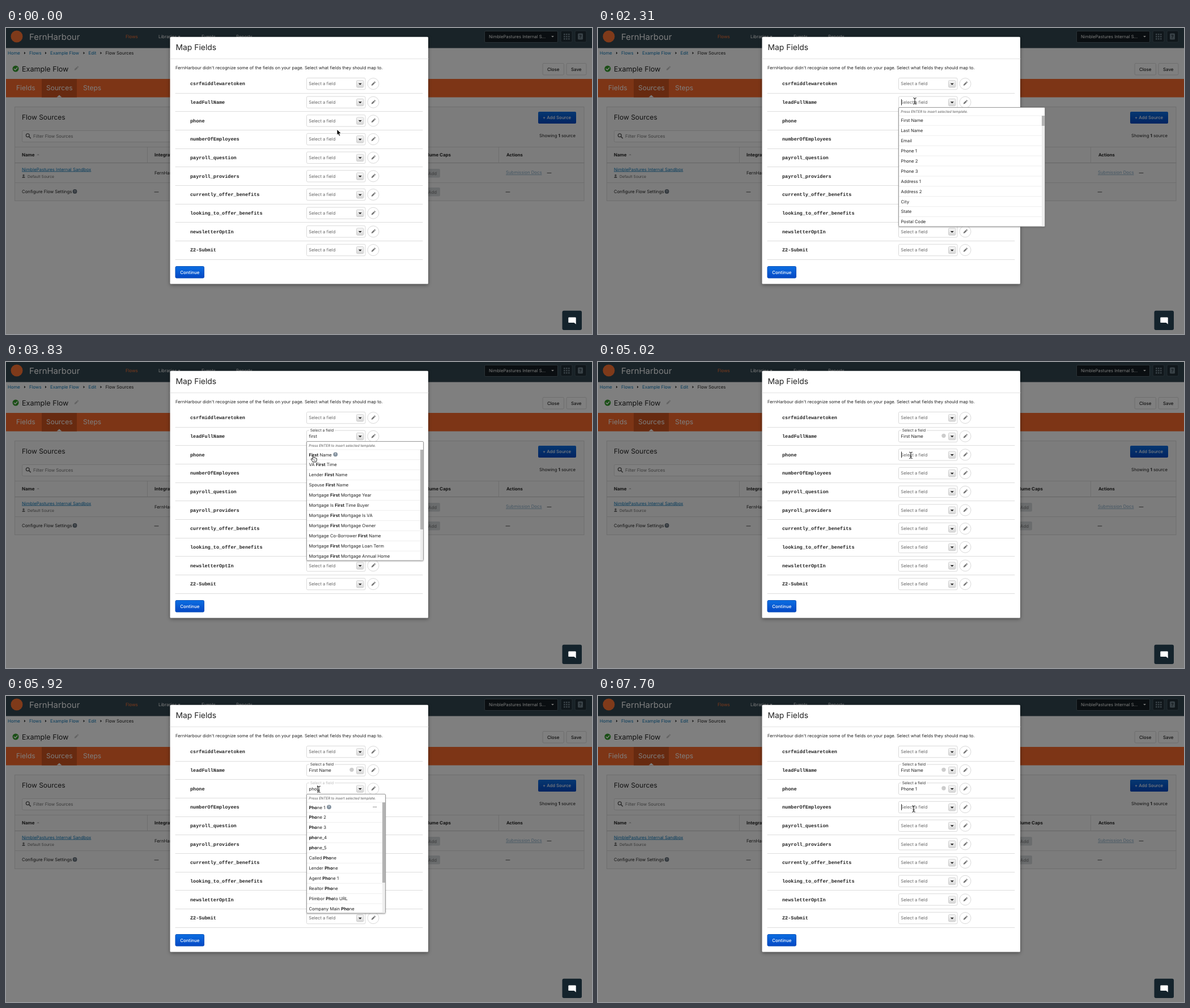
Recreate the animation shown at these times as an HTML page. Size 1034 by 541 pixels, loop 7990 ms.

```html
<!DOCTYPE html>
<html lang="en">
<head>
<meta charset="utf-8">
<title>Map Fields</title>
<style>
html, body { margin: 0; width: 100%; height: 100%; overflow: hidden; background: #808080; }
svg { display: block; width: 1034px; height: 541px; }
text { font-family: Inter, "Open Sans", sans-serif; text-rendering: geometricPrecision; white-space: pre; }
.mono { font-family: "Liberation Mono", "DejaVu Sans Mono", monospace; font-weight: 700; }
.b { font-weight: 700; }
.m { font-weight: 500; }
.i { font-style: italic; }
.u { text-decoration: underline; }
.modal { filter: drop-shadow(0 2px 3px rgba(0,0,0,.4)); }
.menu { filter: drop-shadow(0 1px 1px rgba(0,0,0,.25)); }
</style>
</head>
<body>
<svg viewBox="0 0 1034 541" xmlns="http://www.w3.org/2000/svg">
  <defs>
    <linearGradient id="blue" x2="0" y2="1"><stop stop-color="#0b6ee2"/><stop offset="1" stop-color="#0548c4"/></linearGradient>
    <linearGradient id="grey" x2="0" y2="1"><stop stop-color="#f8f8f8"/><stop offset="1" stop-color="#d6d6d6"/></linearGradient>
    <clipPath id="menuClip"><rect x="531" y="0" width="260" height="210"/></clipPath>
  </defs>
  <g id="page"></g>
  <rect width="1034" height="541" opacity=".5"/>
  <g id="modal"></g>
  <g id="live"></g>
  <g id="pointer"></g>
  <g id="chat"></g>
</svg>
<script>
const LOOP = 7990;
const INK = '#222', LINK = '#0c78b8', SMALL = 7.7;
const $ = id => document.getElementById(id);

const text = (x, y, s, size = SMALL, fill = INK, cls = '') =>
  `<text x="${x}" y="${y}" font-size="${size}" fill="${fill}" class="${cls}">${s}</text>`;
const rect = (x, y, w, h, fill, stroke = 'none', r = 0) =>
  `<rect x="${x}" y="${y}" width="${w}" height="${h}" rx="${r}" fill="${fill}" stroke="${stroke}"/>`;
const path = (d, fill, stroke = 'none', w = 1) =>
  `<path d="${d}" fill="${fill}" stroke="${stroke}" stroke-width="${w}" stroke-linejoin="round" stroke-linecap="round"/>`;
const dot = (x, y, r, fill, stroke = 'none') =>
  `<circle cx="${x}" cy="${y}" r="${r}" fill="${fill}" stroke="${stroke}"/>`;
const hline = (x1, x2, y, c) => path(`M${x1} ${y}H${x2}`, 'none', c);
const caretDown = (x, y, c, w = 3) => path(`M${x - w} ${y - w / 2}h${2 * w}l${-w} ${w}z`, c);
const pencil = (x, y, c) =>
  `<g transform="translate(${x} ${y}) rotate(45)">` +
  rect(-1.3, -4.8, 2.6, 1.5, c) + path('M-1.3 -2.7h2.6v5.2l-1.3 2.2l-1.3 -2.2z', c) + '</g>';
const help = (x, y, fill) =>
  dot(x, y, 3.9, fill) + text(x - 1.6, y + 2, '?', 5.4, '#fff', 'm');

function drawPage() {
  const nav = [['Flows', 211, '#ff7434'], ['Libraries', 269, '#fff'], ['Events', 345, '#fff'], ['Reports', 406, '#fff']];
  const crumbs = [['Home', 3], ['Flows', 41], ['Example Flow', 78], ['Edit', 145.5], ['Flow Sources', 175.5]];
  const tabs = [['Fields', 18], ['Sources', 71], ['Steps', 136]];
  let s = rect(0, 0, 1034, 541, '#fff') + rect(0, 0, 1034, 35.5, '#324651');

  s += dot(19, 15, 10.5, '#ff7434') + text(41, 20.5, 'FernHarbour', 14.9, '#fff');
  for (const [label, x, c] of nav) s += text(x, 17.5, label, 7.9, c);
  s += caretDown(305.5, 15, '#fff', 2.2);
  s += rect(844.5, 5.5, 129, 20, '#141d22', '#55656f', 2) +
    text(852, 18, 'NimblePastures Internal S...', 7.7, '#fff') + caretDown(964.5, 15.2, '#fff', 2.4);
  s += rect(979, 5, 20, 20, '#202e36', '#465863', 2) + rect(1004, 5, 20, 20, '#202e36', '#465863', 2);
  for (let k = 0; k < 9; k++) s += rect(984 + k % 3 * 4, 10 + (k / 3 | 0) * 4, 2.6, 2.6, '#71838d');
  s += rect(1009, 9.5, 9, 11, '#71838d', 'none', 1.5) + text(1011.2, 18, '?', 8, '#202e36', 'b');

  crumbs.forEach(([label, x], k) => {
    s += text(x, 47, label, 7.8, k < 4 ? LINK : INK);
    if (k) s += path(`M${x - 9} 42l2.5 2.3l-2.5 2.3z`, '#333');
  });

  s += dot(17, 72, 5.5, '#35a02c') + path('M14.3 72.2l2 2l3.6 -4', 'none', '#fff', 1.5);
  s += text(28, 76.5, 'Example Flow', 12.6) + pencil(124, 71.5, '#c8c8c8');
  s += rect(947, 62.5, 37.5, 20.5, '#fff', '#ddd', 2) + text(955, 75.7, 'Close', 7.9, INK, 'm') +
    rect(989, 62.5, 35, 20.5, '#fff', '#ddd', 2) + text(997, 75.7, 'Save', 7.9, INK, 'm');

  s += rect(0, 90, 1034, 32.5, '#fb6a2c') + rect(63, 90, 62, 32.5, '#cf5420');
  for (const [label, x] of tabs) s += text(x, 110.3, label, 12, '#fff');
  s += path('M89.5 122.5l4.5 -4l4.5 4z', '#fff');

  s += rect(15.5, 139.5, 1004.5, 166, '#fafafa', '#ddd');
  s += text(28, 162.3, 'Flow Sources', 12);
  s += rect(939, 148, 67, 21, 'url(#blue)', 'none', 2) + text(947, 161.2, '+ Add Source', 7.7, '#fff', 'm');
  s += rect(28.5, 181.5, 372, 20, '#fff', '#ddd', 2) + text(48, 194, 'Filter Flow Sources', 7.8, '#777') +
    `<circle cx="38.3" cy="189.8" r="2.9" fill="none" stroke="#555" stroke-width="1.3"/>` +
    path('M40.5 192l2.8 2.8', 'none', '#555', 1.6);
  s += text(941, 193, 'Showing <tspan class="b">1</tspan> source', 7.7);

  s += hline(16, 1020, 210.5, '#ddd') + hline(16, 1020, 238.5, '#ccc') + hline(16, 1020, 273.5, '#ddd');
  for (const x of [249.5, 869.5]) s += path(`M${x} 211V238`, 'none', '#ddd');
  s += text(28, 226.7, 'Name', 7.9, INK, 'b') + path('M54.5 225l2.2 -2.4l2.2 2.4z', '#bbb') +
    text(262, 226.7, 'Integration', 7.9, INK, 'b') +
    text(734, 226.7, 'Volume Caps', 7.9, INK, 'b') + text(883, 226.7, 'Actions', 7.7, INK, 'b');
  s += text(28, 252.5, 'NimblePastures Internal Sandbox', 7.8, LINK, 'u');
  s += dot(31, 260.3, 1.6, '#777') + path('M28.4 265c0 -3.6 5.2 -3.6 5.2 0z', '#777') +
    text(38, 264.7, 'Default Source', 6.7, '#666');
  s += text(262, 259, 'FernHarbour', 7.8) + text(882, 258, 'Submission Docs', 7.8, '#84a9c4', 'u');
  s += hline(955, 962, 256.3, '#555') + hline(262, 269, 290, '#555') + hline(882, 889, 290, '#555');
  s += text(28, 292, 'Configure Flow Settings', 7.8) + help(121.5, 289, '#6b7680');
  for (const y of [249, 282]) s += rect(735, y, 31, 15.5, '#d6d9dc', 'none', 2) + text(745, y + 10.6, 'Add', 7.8, '#777');
  return s;
}

const names = ['csrfmiddlewaretoken', 'leadFullName', 'phone', 'numberOfEmployees', 'payroll_question',
  'payroll_providers', 'currently_offer_benefits', 'looking_to_offer_benefits', 'newsletterOptIn', 'Z2-Submit'];
const rowY = k => 98.6 + k * 32.66;

function drawModal() {
  let s = `<g class="modal">${rect(289.5, 15.8, 455.5, 436.7, '#fff', 'none', 1.5)}</g>`;
  s += text(299.5, 38.5, 'Map Fields', 13.9) + hline(290, 745, 54.5, '#e3e3e3');
  s += text(299, 72.6, "FernHarbour didn't recognize some of the fields on your page. Select what fields they should map to.", 7.66);
  names.forEach((name, k) => {
    const y = rowY(k);
    s += text(325, y + 2.8, name, 8.5, INK, 'mono');
    s += hline(299, 735, Math.round(y + 16) + .5, '#ddd');
    s += rect(530.5, y - 10.2, 103.5, 20.4, '#fff', '#d9d9d9', 2);
    s += rect(618.5, y - 6, 12.5, 12.5, 'url(#grey)', '#d0d0d0', 2) + caretDown(624.8, y + .6, '#222');
    s += dot(648, y, 10, '#fff', '#d9d9d9') + pencil(648, y, '#777');
  });
  return s + rect(299, 421.5, 50.5, 20.5, 'url(#blue)', '#0a4fb8', 2) + text(307.3, 434.6, 'Continue', 7.9, '#fff', 'm');
}

// Menus: right edge, thumb length, highlighted query, items
const phones = ['Phone 1', 'Phone 2', 'Phone 3', 'phone_4', 'phone_5', 'Called Phone', 'Lender Phone', 'Agent Phone 1', 'Realtor Phone'];
const menus = {
  all: { right: 788.5, thumb: 18, query: '', items: ['First Name', 'Last Name', 'Email', 'Phone 1', 'Phone 2', 'Phone 3',
    'Address 1', 'Address 2', 'City', 'State', 'Postal Code'] },
  fi: { right: 783.5, thumb: 44, query: 'fi', items: ['affid', 'First Name', 'Name Suffix', 'VA First Time', 'offer_benefits',
    'Has Certification', "Mona's Test Field", 'Lender First Name', 'Spouse First Name', 'Quonvera FilterID', 'snapyard_field_data'] },
  first: { right: 736.5, thumb: 141, query: 'first', icon: 581.3, items: ['First Name', 'VA First Time', 'Lender First Name',
    'Spouse First Name', 'Mortgage First Mortgage Year', 'Mortgage Is First Time Buyer', 'Mortgage First Mortgage Is VA',
    'Mortgage First Mortgage Owner', 'Mortgage Co-Borrower First Name', 'Mortgage First Mortgage Loan Term',
    'Mortgage First Mortgage Annual Home'] },
  pho: { right: 669.5, thumb: 142, query: 'pho', icon: 570, more: true,
    items: [...phones, 'Plimbor Photo URL', 'Company Main Phone'] },
  phone: { right: 669.5, thumb: 142, query: 'phone', icon: 570, more: true,
    items: [...phones, 'Company Main Phone', 'Spouse Phone'] }
};

function highlight(item, query) {
  const at = item.toLowerCase().indexOf(query), end = at + query.length;
  return query ? `${item.slice(0, at)}<tspan class="b">${item.slice(at, end)}</tspan>${item.slice(end)}` : item;
}

function drawMenu(key, row) {
  const { right, thumb, query, icon, more, items } = menus[key];
  const top = Math.round(rowY(row) + 9) + .5, step = 17.94, first = icon ? 23.2 : 22.7;
  let s = `<g class="menu">${rect(530.5, 0, right - 530.5, 210.5, '#fff', '#999', 1.5)}</g><g clip-path="url(#menuClip)">`;
  s += text(534.3, 9, 'Press ENTER to insert selected template.', 6.15, '#555', 'i') + hline(531, right - 6, 14.5, '#eee');
  items.forEach((item, k) => {
    const y = first + k * step;
    s += text(534.5, y + 2.8, highlight(item, query)) + hline(531, right - 6, y + 9, '#eee');
  });
  if (icon) s += help(icon, first - .4, '#8593a0');
  if (more) for (const x of [648.3, 650.7, 653.1]) s += dot(x, first - .5, .8, '#666');
  s += rect(right - 5.5, 14.5, 5, 196, '#eee') + rect(right - 5.5, 14.5, 5, thumb, '#b4b4b4');
  return `<g transform="translate(0 ${top})">${s}</g></g>`;
}

function drawField(row, { value = '', faint, chosen }) {
  const y = rowY(row);
  if (!value) return text(534.3, y + 2.8, 'Select a field', SMALL, '#666');
  return rect(535, y - 11.5, 45, 3, '#fff') +
    text(536.7, y - 7.8 - (faint ? .4 : 0), 'Select a field', 6.75, faint ? '#bbb' : '#333') +
    text(534.5, y + 2.8, value) + (chosen ? dot(610, y - .9, 3.7, '#ccc') : '');
}

// Form states: [ms, row in use, typed text, menu, caret x]
const forms = [
  [0], [2310, 1, '', 'all', 535.5], [2760, 1, '', 'all'], [3060, 1, 'fi', 'fi', 539.8], [3210, 1, 'first', 'first'],
  [4280], [5020, 2, '', '', 535.5], [5320, 2, '', 'all', 535.5], [5920, 2, 'pho', 'pho', 549.6], [6060, 2, 'phone', 'phone'],
  [6950], [7700, 3, '', '', 535.5]
];

function drawForm([ms, row, typed, menu, caret]) {
  const chosen = {};
  if (ms >= 4280) chosen[1] = 'First Name';
  if (ms >= 6950) chosen[2] = 'Phone 1';
  let s = names.map((_, k) => drawField(k, k === row && typed
    ? { value: typed, faint: typed.length < 4 }
    : { value: chosen[k], chosen: true })).join('');
  if (caret) s += path(`M${caret} ${rowY(row) - 5}v10`, 'none', '#111', .9);
  return s + (menu ? drawMenu(menu, row) : '');
}

// Pointer positions: [ms, shape, x, y]
const moves = [
  [0, 'arrow', 584, 179.5], [450, 'beam', 573, 131], [690, 'beam', 577, 133], [1560, 'beam', 559, 129],
  [3540, 'hand', 552, 148], [3690, 'hand', 545, 161], [3830, 'hand', 542, 164.3],
  [4280, 'beam', 542.5, 165], [4570, 'beam', 552, 164.8],
  [6360, 'hand', 553, 178], [6510, 'hand', 550, 189], [6660, 'hand', 547, 193.7],
  [6950, 'beam', 547, 200], [7100, 'beam', 550, 200], [7250, 'beam', 553.5, 200], [7400, 'beam', 556, 199.7], [7550, 'beam', 557, 199.5]
];
const shapes = {
  arrow: path('M0 0v9.8l2.2 -2l1.6 3.7l1.9 -.8l-1.6 -3.6h3.1z', '#000', '#fff', .8),
  beam: path('M-2.4 -5.4q2.4 0 2.4 1.5q0 -1.5 2.4 -1.5M0 -4V4.2M-2.4 5.6q2.4 0 2.4 -1.5q0 1.5 2.4 1.5M-1.3 1.8h2.6', 'none', '#111', 1),
  hand: path('M-1 .9q1 -1.5 2 0v4q1.2 -.9 1.9 .3q1.1 -.6 1.8 .5q1.5 -.4 1.5 1.2v2.4l-1.2 3.2h-5.6l-2.9 -4.6q-.5 -1.6 1.1 -1.4l1.4 1.2z', '#fff', '#000', .9) +
    path('M1.3 8.2v2M3.1 8.2v2', 'none', '#000', .5)
};
const drawPointer = ([, shape, x, y]) => `<g transform="translate(${x} ${y})">${shapes[shape]}</g>`;

$('page').innerHTML = drawPage();
$('modal').innerHTML = drawModal();
$('chat').innerHTML = rect(981.5, 499.7, 34.5, 34.3, '#14232c', 'none', 3) +
  path('M993.5 511.5h11q1.2 0 1.2 1.2v11l-3.2 -2.6h-9q-1.2 0 -1.2 -1.2v-7.2q0 -1.2 1.2 -1.2z', '#fff');

const shown = {};
function show(id, steps, draw, t) {
  const step = steps.findLast(s => s[0] <= t);
  if (shown[id] === step) return;
  shown[id] = step;
  $(id).innerHTML = draw(step);
}
function tick() {
  const t = performance.now() % LOOP;
  show('live', forms, drawForm, t);
  show('pointer', moves, drawPointer, t);
  requestAnimationFrame(tick);
}
tick();
</script>
</body>
</html>
```
